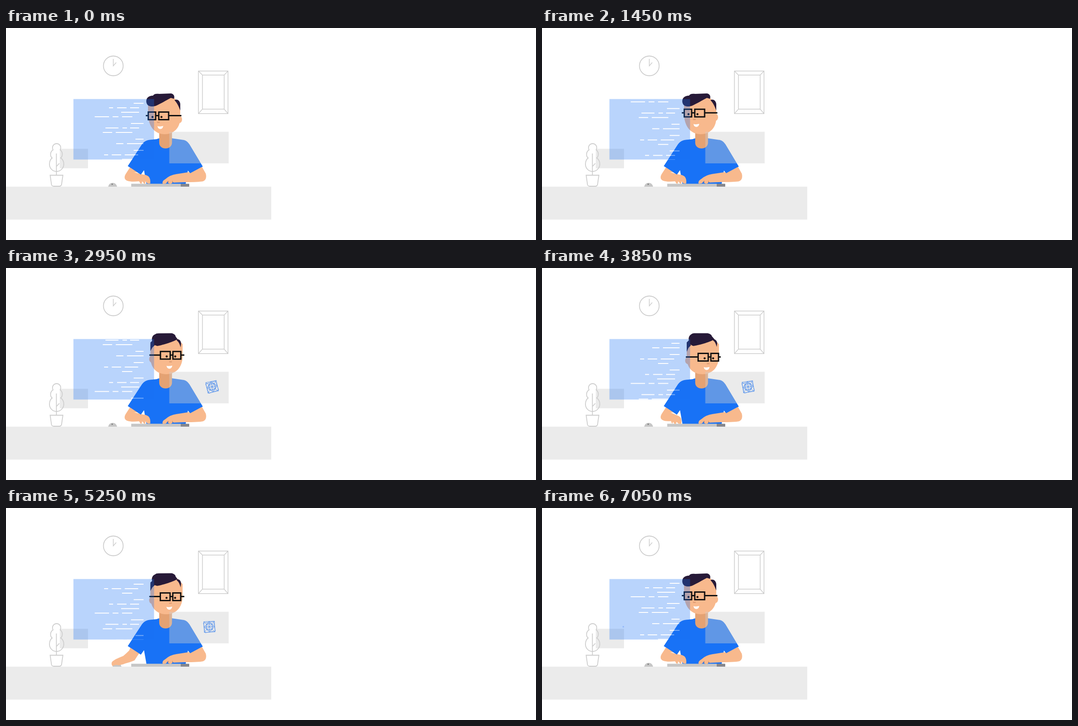
An HTML page that plays this animation: 1183 by 473 pixels, repeating every 7100 ms.

```html
<!DOCTYPE html>
<html lang="en">
<head>
<meta charset="utf-8">
<title>Coder at a desk</title>
<style>
html, body { margin: 0; width: 100%; height: 100%; overflow: hidden; background: #fff; }
svg { display: block; }
.outline { fill: none; stroke: #ccc; stroke-width: 1.8; }
.skin { fill: #f8b98d; }
.shirt { fill: #1872f6; }
.hair { fill: #271a38; }
.glasses { fill: none; stroke: #111; stroke-width: 3; }
.pane { fill: #ccc; opacity: .4; }
</style>
</head>
<body>
<svg width="1183" height="473" viewBox="0 0 1183 473">
  <defs>
    <clipPath id="screen"><rect x="150.500" y="159" width="180" height="134.500"/></clipPath>
  </defs>

  <g class="outline">
    <circle cx="239.500" cy="84.500" r="22"/>
    <path d="M239.500 69V84.500L246 77" stroke-width="1.500"/>
    <path d="M429.500 96H495.500V191H429.500ZM438.500 105H487V181H438.500ZM429.500 96L438.500 105M495.500 96L487 105M495.500 191L487 181M429.500 191L438.500 181" stroke-width="1.500"/>
    <path d="M113 320C103 320 97 312 97 304C97 297 99 293 103 290C98 286 98 276 105 272C101 263 108 258 113 258C118 258 125 263 121 272C127 276 127 286 122 290C127 293 129 297 129 304C129 312 122 320 113 320ZM112.500 280V328M112.500 309L119 302"/>
    <path d="M98.500 328.500H127L124 349Q123 353 119 353H107Q102 353 101.500 349Z"/>
  </g>
  <rect class="pane" x="120" y="269.500" width="63" height="43.500"/>

  <rect y="354" width="592" height="73.500" fill="#ebebeb"/>
  <g id="mouse">
    <path d="M-10 354Q-8 345.500 0 345.500Q8 345.500 10 354Z" fill="#c6c6c6"/>
    <circle cx="-1" cy="348.500" r="1.500" fill="#777"/>
  </g>

  <path id="shirt" class="shirt" d="M336 248L318 250Q309 252 304 259L272 308L301 327L308 317L313.500 348H401L406 318L411 324L439 309L409 259Q403 250 394 249.500L370 246H342Z"/>
  <path d="M342 230H370.500V256C370 273 342 273 342 256Z" fill="#e4a273"/>

  <g id="head">
    <ellipse id="earLeft" class="skin" cx="325.500" rx="6" ry="8"/>
    <ellipse id="earRight" class="skin" cx="387" rx="6" ry="8"/>
    <path id="face" class="skin"/>
    <path id="hairLeft" class="hair"/>
    <path id="hairRight" class="hair"/>
    <path id="hairTop" class="hair"/>
    <g id="features">
      <path id="glasses" class="glasses"/>
      <circle id="eyeLeft" cy="198.500" r="2.300" fill="#111"/>
      <circle id="eyeRight" cy="198.500" r="2.300" fill="#111"/>
      <path id="nose" d="M-3 210.500H3" stroke="#d9976e" stroke-width="2"/>
    </g>
    <path id="mouth" d="M-6.500 -2.500Q0 -1 6.500 -3Q5 4 0 4Q-5 4 -6.500 -2.500Z" fill="#fff"/>
  </g>

  <rect x="279.500" y="347.500" width="110.500" height="6.500" fill="#c6c6c6"/>
  <rect x="390" y="347.500" width="19" height="6.500" fill="#87878c"/>
  <path id="leftArm" class="skin"/>
  <g id="rightArm">
    <path class="skin" d="M437 309L446 325Q449 338 440 342Q430 344 400 344L374 345L371 342V346L367 348L362 346V341L357 347L350 348Q347 342 356 337Q366 328 380 326L412 321L420 305Z"/>
    <path d="M362 341V346M371.500 341V345" fill="none" stroke="#d58f63"/>
  </g>
  <path class="shirt" d="M304 259L272 308L301 327L310 314ZM409 259L439 309L411 324L403 312Z"/>

  <rect class="pane" x="364.500" y="231.500" width="132.500" height="70.500"/>
  <rect x="150.500" y="158.500" width="180" height="135" fill="#1872f6" opacity=".3"/>
  <g clip-path="url(#screen)">
    <path id="code" fill="none" stroke="#fff" stroke-width="2"/>
    <use href="#shirt" opacity=".6"/>
  </g>
  <g id="cube" fill="none" stroke="#4f8eec" stroke-width=".8">
    <path d="M-12 -12H12V12H-12ZM-13 -9L10 -11L13 10L-10 13ZM-6 -6H6V6H-6ZM-12 -12L12 12M12 -12L-12 12M0 -12V12M-12 0H12M0 -12L-12 0L0 12L12 0Z"/>
    <circle r="8"/>
  </g>
</svg>

<script>
const LOOP = 7100, CODE_HEIGHT = 139.5;
const el = id => document.getElementById(id);
const set = (id, name, value) => el(id).setAttribute(name, value);
const mix = (a, b, k) => a + (b - a) * k;

// Cubic ease-in-out progress of t between two times
function ease(t, from, to) {
  const x = Math.min(1, Math.max(0, (t - from) / (to - from)));
  return x < .5 ? 4 * x ** 3 : 1 - 4 * (1 - x) ** 3;
}

function follow(keys, t) {
  const i = Math.max(1, keys.findIndex(key => key[0] >= t));
  const [t0, a] = keys[i - 1], [t1, b] = keys[i];
  return mix(a, b, (t - t0) / (t1 - t0));
}

// Blends two paths that share the same commands
function morph(a, b, k) {
  const target = b.match(/[\d.]+/g);
  let i = 0;
  return a.replace(/[\d.]+/g, n => mix(+n, +target[i++], k).toFixed(2));
}

// Each row: y, then pairs of start and end x
const rows = [
  [168, 285, 307], [178, 230, 239, 248, 269, 277, 297], [188, 257, 297],
  [198, 198, 230, 238, 251, 259, 282], [213, 279, 307],
  [223, 222, 251, 260, 270, 277, 297], [233, 216, 237, 245, 282],
  [248, 289, 307], [258, 246, 262, 270, 307], [273, 285, 307],
  [283, 219, 228, 236, 257, 265, 295], [293, 259, 282]
];
let codePath = "";
for (const page of [0, 1])
  for (const [y, ...xs] of rows)
    for (let i = 0; i < xs.length; i += 2)
      codePath += `M${xs[i]} ${y + page * CODE_HEIGHT}H${xs[i + 1]}`;
set("code", "d", codePath);

const scrollKeys = [[0, 0], [850, 22.2], [2250, 48], [3850, 80], [5250, 103], [5950, 122.3], [7050, CODE_HEIGHT], [LOOP, CODE_HEIGHT]];
const nodKeys = [[0, 0], [850, -4], [1900, -8], [2250, -7], [3450, 3], [4700, 3], [5250, 2], [5950, -2.5], [6300, -3.5], [7050, 0], [LOOP, 0]];

// Head shapes facing left and right
const head = {
  face: ["M317 170L350 155L374 155L389 170L389 200C389 225 372 237 354 237C334 237 317 222 317 190Z",
         "M323 170L340 158L384 158L395 170L395 195C395 224 378 237 358 237C338 237 323 224 323 200Z"],
  hairTop: ["M314 168C311 158 317 151 328 151C330 147 335 146 342 147L368 146C375 147 377 153 375 158L368 156C358 161 345 169 336 173C326 177 316 175 314 168Z",
            "M328 162C326 156 329 150 333 148C335 146 338 145.500 342 145.500L370 145.500C376 147 379 150 379 152L385 159C378 164 352 172 338 174C332 172 328 168 328 162Z"],
  hairLeft: ["M318 168L330 160L331 168L325 171L318 172Z",
             "M323 166L330 159L332 173L327 178L323 187Z"],
  hairRight: ["M376 161C382 157 389 163 389 170L389 184C386 176 382 167 376 161Z",
              "M382 159C388 158 391 164 391 168L390 176C388 169 386 164 382 162Z"],
  glasses: ["M312 195.500L317 195.500M317.500 187.500L334 187.500L334 204.500L317.500 204.500ZM334 195.500L341 195.500M341 187.500L363 187.500L363 204.500L341 204.500ZM363 195.500L391.500 195.500",
            "M321 195.500L348 195.500M348.500 187.500L371 187.500L371 204.500L348.500 204.500ZM371 195.500L377 195.500M377 187.500L394 187.500L394 204.500L377 204.500ZM394 195.500L399 195.500"]
};

const arm = {
  typing: "M280 306L267 326Q261 337 271 341Q280 344 297 342L300 347L303 347L304 342L308 347L311 347L311 342L316 347L322 347Q323 336 318 331Q312 327 306 327L286 322L301 322Z",
  mouseLeft: "M280 306L271 318Q264 325 258 329Q244 335 237 338L230 342L227 345L226 349L228 353L232 351L239 350L243 351L247 350Q253 349 258 347Q270 344 281 340L293 326L301 322Z",
  mouseRight: "M280 306L275 318Q268 325 262 330Q250 335 244 338L238 342L236 345L236 349L238 353L241 351L248 350L252 351L256 350Q262 349 266 347Q278 344 287 340L296 326L302 322Z"
};

function drawHead(t) {
  const turn = ease(t, 1850, 3450) - ease(t, 4720, 6383);
  const nod = follow(nodKeys, t);
  for (const id in head) set(id, "d", morph(...head[id], turn));
  set("features", "transform", `translate(0 ${nod})`);
  set("eyeLeft", "cx", mix(327, 363, turn));
  set("eyeRight", "cx", mix(347, 382, turn));
  set("nose", "transform", `translate(${mix(340, 371, turn)})`);
  set("mouth", "transform", `translate(${mix(344.5, 367.5, turn)} ${221.5 + nod * .75})`);
  for (const id of ["earLeft", "earRight"]) set(id, "cy", 204 + nod * .8);
}

function drawArms(t) {
  const reach = ease(t, 3600, 4350) - ease(t, 6250, 6750);
  const drag = ease(t, 4400, 4900) - ease(t, 5054, 6174);
  const onMouse = morph(arm.mouseLeft, arm.mouseRight, drag);
  set("leftArm", "d", morph(arm.typing, onMouse, reach));
  set("mouse", "transform", `translate(${238 + 10 * drag})`);
  const typing = t < 1700 || t > 6675;
  const tap = typing ? .6 * Math.sin(2 * Math.PI * (t < 1700 ? t : t - 6675) / 425) : 0;
  set("rightArm", "transform", `rotate(${tap} 430 335)`);
}

function drawCube(t) {
  const x = mix(460, 181.5, ease(t, 5054, 6174));
  const grow = ease(t, 2350, 2950);
  const shrink = Math.max(0, (t - 6650) / 450);
  const size = grow * Math.max(0, 1 - shrink);
  set("cube", "transform", `translate(${x} 265) rotate(${(t - 5900) / 250}) scale(${size})`);
}

function draw(t) {
  set("code", "transform", `translate(0 ${-follow(scrollKeys, t)})`);
  drawHead(t);
  drawArms(t);
  drawCube(t);
}

const start = performance.now();
function tick() {
  draw((performance.now() - start) % LOOP);
  requestAnimationFrame(tick);
}
tick();
</script>
</body>
</html>
```
